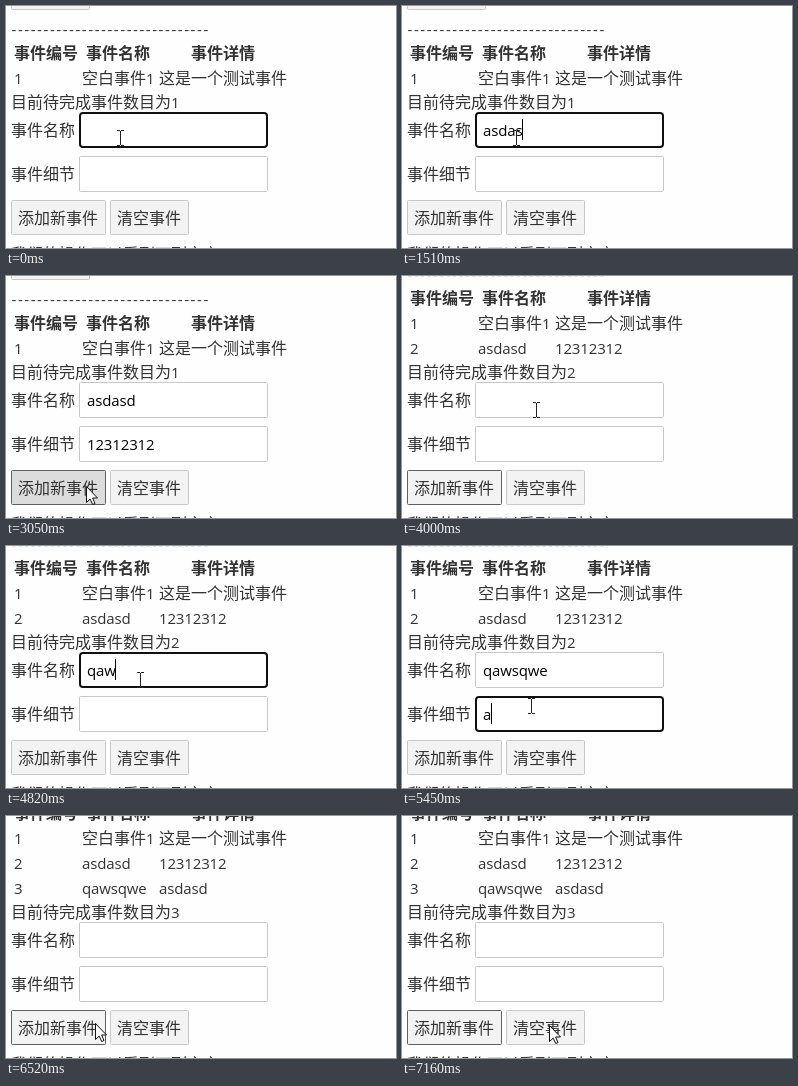
Animation of 390x242 px, one loop 8000 ms. Source, as an HTML page with a canvas:

```html
<!DOCTYPE html>
<html lang="zh-CN">
<head>
<meta charset="utf-8">
<style>
html, body { margin: 0; width: 100%; height: 100%; overflow: hidden; background: #fefefe; }
canvas { display: block; }
</style>
</head>
<body>
<canvas id="stage" width="390" height="242"></canvas>
<script>
const ctx = document.getElementById('stage').getContext('2d');
const LOOP = 8000, ROW = 25;
const INK = '#333', GREY = '#c8c8c8', BUTTON = '#f3f3f3';
const LATIN = '15px "Open Sans", "Noto Sans", sans-serif';
const HAN = '16px "Noto Sans CJK SC", "Noto Sans CJK", sans-serif';

const ROWS = [
  ['1', '空白事件1', '这是一个测试事件'],
  ['2', 'asdasd', '12312312'],
  ['3', 'qawsqwe', 'asdasd'],
];

// Each step changes only the listed parts of the state.
const beam = (x, y) => ({ pointer: 'beam', x, y });
const arrow = (x, y) => ({ pointer: 'arrow', x, y });
const name = s => ({ name: s, caret: true });
const detail = s => ({ detail: s, caret: true });
const focus = field => ({ focus: field, caret: true });
const press = { focus: 'add', pressed: true };
const added = rows => ({ rows, name: '', detail: '', pressed: false });

const STEPS = [
  [0, { rows: 1, name: '', detail: '', focus: 'name', caret: false, pressed: false, ...beam(114, 132) }],
  [560, { caret: true }],
  [990, { caret: false }],
  [1140, name('a')],
  [1260, name('asd')],
  [1510, name('asdas')],
  [1630, name('asdasd')],
  [1750, beam(115, 157)],
  [1900, { ...focus('detail'), ...beam(115, 159) }],
  [2020, detail('1')],
  [2140, detail('12')],
  [2260, detail('123')],
  [2540, detail('12312')],
  [2660, detail('123123')],
  [2780, detail('12312312')],
  [2900, arrow(80, 210)],
  [3050, press],
  [3200, added(2)],
  [3600, arrow(98, 202)],
  [3730, arrow(117, 208)],
  [3880, beam(131, 142)],
  [4000, beam(134, 134)],
  [4160, focus('name')],
  [4550, name('q')],
  [4670, name('qa')],
  [4820, name('qaw')],
  [4940, name('qaws')],
  [5060, name('qawsq')],
  [5180, name('qawsqw')],
  [5300, { ...name('qawsqwe'), ...beam(129, 160) }],
  [5450, { ...focus('detail'), ...detail('a') }],
  [5610, detail('asd')],
  [5760, detail('asda')],
  [5880, detail('asdasd')],
  [6000, arrow(78, 209)],
  [6120, press],
  [6240, added(3)],
  [6520, arrow(89, 207)],
  [6670, arrow(108, 209)],
  [6790, arrow(128, 210)],
  [6910, arrow(146, 209)],
  [7160, arrow(147, 209)],
];

const stateAt = t =>
  Object.assign({}, ...STEPS.filter(([start]) => start <= t).map(([, change]) => change));

// Latin and Chinese runs use different faces; returns the end of the line.
function text(string, x, baseline, { color = INK, weight = '', spacing = -0.15 } = {}) {
  ctx.fillStyle = color;
  for (const run of string.match(/[\x00-\x7f]+|[^\x00-\x7f]+/g) || []) {
    const latin = run.charCodeAt(0) < 128;
    ctx.font = weight + ' ' + (latin ? LATIN : HAN);
    ctx.letterSpacing = (latin ? spacing : 0) + 'px';
    ctx.fillText(run, x, baseline);
    x += ctx.measureText(run).width;
  }
  return x;
}

function box(x, y, w, h, fill, stroke, line = 1, radius = 1) {
  ctx.beginPath();
  ctx.roundRect(x + line / 2, y + line / 2, w - line, h - line, radius);
  ctx.fillStyle = fill;
  ctx.fill();
  ctx.strokeStyle = stroke;
  ctx.lineWidth = line;
  ctx.stroke();
}

function table(rows) {
  const top = 53 - (rows - 1) * ROW;
  box(5, top - 85, 79, 36, BUTTON, GREY);
  text('-'.repeat(31), 5.5, top - 24, { spacing: 1.57 });
  text('事件编号', 8, top, { weight: 'bold' });
  text('事件名称', 80, top, { weight: 'bold' });
  text('事件详情', 185, top, { weight: 'bold' });
  ROWS.slice(0, rows).forEach(([id, title, info], i) => {
    const y = top + (i + 1) * ROW;
    text(id, 8, y);
    text(title, 76, y);
    text(info, 153, y);
  });
  text('目前待完成事件数目为' + rows, 5, 102);
}

function field(label, y, value, focused, caret) {
  text(label, 5, y + 24);
  if (focused) box(73, y, 189, 36, '#fff', '#101010', 2, 3);
  else box(73, y, 189, 36, '#fff', GREY);
  const end = text(value, 81, y + 24, { color: '#000' });
  if (focused && caret) {
    ctx.fillStyle = '#000';
    ctx.fillRect(Math.floor(end), y + 7, 1, 21);
  }
}

function button(label, x, w, focused, pressed) {
  box(x, 194, w, 35, pressed ? '#dcdcdc' : BUTTON, focused ? '#606060' : GREY);
  text(label, x + 7, 218);
}

function drawPointer({ pointer, x, y }) {
  ctx.save();
  ctx.translate(x, y);
  if (pointer === 'beam') {
    ctx.fillStyle = '#222';
    ctx.fillRect(0, -7, 1, 14);
    for (const edge of [-8, 7]) {
      ctx.fillRect(-3, edge, 3, 1);
      ctx.fillRect(1, edge, 3, 1);
    }
  } else {
    ctx.translate(0.5, 0.5);
    ctx.fillStyle = '#fff';
    ctx.strokeStyle = '#111';
    ctx.lineWidth = 1;
    const shape = new Path2D('M0 0V16L3.7 12.6L6.2 18L8.5 17L6.1 11.5H11Z');
    ctx.fill(shape);
    ctx.stroke(shape);
  }
  ctx.restore();
}

function frame() {
  const s = stateAt(performance.now() % LOOP);
  ctx.fillStyle = '#fefefe';
  ctx.fillRect(0, 0, 390, 242);
  table(s.rows);
  field('事件名称', 106, s.name, s.focus === 'name', s.caret);
  field('事件细节', 150, s.detail, s.focus === 'detail', s.caret);
  button('添加新事件', 5, 95, s.focus === 'add', s.pressed);
  button('清空事件', 104, 79, false, false);
  text('我们的操作可以看到下列文字', 5, 254);
  drawPointer(s);
  requestAnimationFrame(frame);
}
frame();
</script>
</body>
</html>
```
